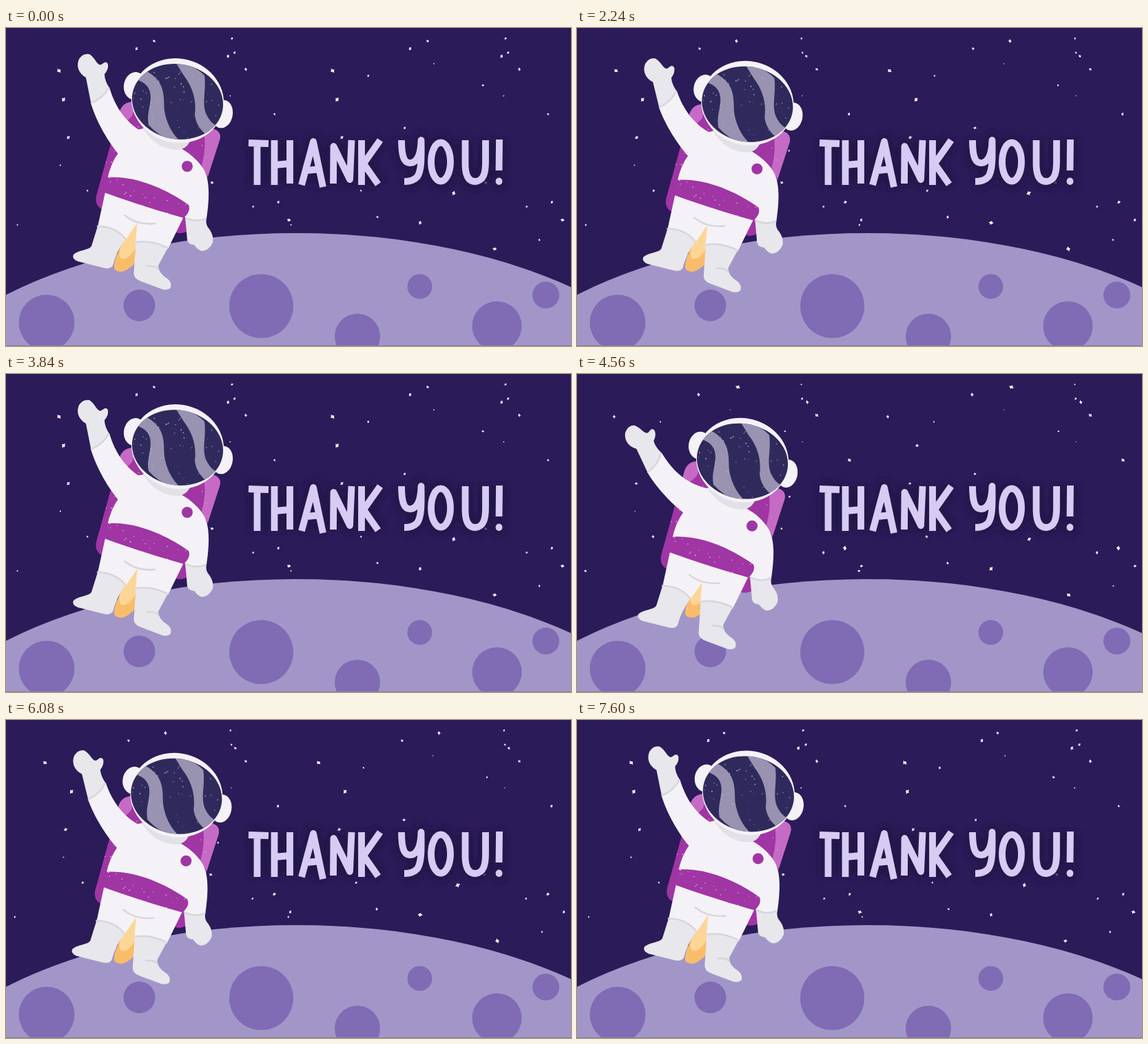
Write an HTML page that moves like this. It is 820x462 px and loops after 7680 ms.

```html
<!DOCTYPE html>
<html lang="en">
<head>
<meta charset="utf-8">
<title>Thank you!</title>
<style>
  html, body { margin: 0; width: 100%; height: 100%; overflow: hidden; background: #2b1b58; }
  svg { display: block; width: 100vw; height: 100vh; }
  .white { fill: #f4f2f6; }
  .grey { fill: #e8e7eb; }
  .violet { fill: #a035a4; }
  .pink { fill: #c66bc5; }
  .seam { fill: none; stroke: #d6d5db; stroke-width: 2.4; stroke-linecap: round; }
  .lettering { fill: none; stroke-linejoin: round; }
</style>
</head>
<body>
<svg viewBox="0 0 820 462" preserveAspectRatio="none">
  <defs>
    <filter id="blur" x="-10%" y="-30%" width="120%" height="160%"><feGaussianBlur stdDeviation="4"/></filter>
    <clipPath id="visorClip"><ellipse cx="249" cy="107" rx="66.500" ry="54.500" transform="rotate(11 249 107)"/></clipPath>
    <clipPath id="beltClip"><path d="M148 217C190 214 236 236 265 257Q269 266 258 276Q200 260 137 237Q140 222 148 217Z"/></clipPath>
    <clipPath id="packClip"><path d="M188 107L300 146Q314 150 310 163L270 287Q265 299 250 298L142 265Q128 259 131 244L165 121Q170 106 188 107Z"/></clipPath>
    <g id="words">
      <path d="M352 167L381 168M364.500 168L364.500 228M389.500 163L389.500 228M412 163L412 226M390 199L412 197"/>
      <path d="M429 228L446 165L460 231M436 207L456 205M475 226L475.500 172L499 220L501.500 163"/>
      <path d="M516 163L516 228M543 163L519 197L540 227M574 163C574 190 579 197 588 196C598 194 602 182 602.500 163C603 190 603 207 597 216Q591 223 578 223"/>
      <ellipse cx="631" cy="194.500" rx="14" ry="28"/>
      <path d="M666.500 163L666.500 199Q667 223 681 223C694 222 696 209 696 194L696 163M716 162L715.500 207"/>
      <path d="M715.500 222.500L715.500 223" stroke-linecap="round"/>
    </g>
  </defs>
  <rect width="820" height="462" fill="#2b1b58"/>
  <g id="stars" fill="#f6f3fa"></g>

  <ellipse cx="421.500" cy="603" rx="595" ry="305" fill="#a296c8"/>
  <g fill="#7f6cb4">
    <circle cx="59" cy="428" r="40.500"/>
    <circle cx="193.500" cy="403" r="23"/>
    <circle cx="370.500" cy="404" r="46.500"/>
    <circle cx="510" cy="448" r="33"/>
    <circle cx="600.500" cy="375.500" r="18"/>
    <circle cx="712.500" cy="433" r="36"/>
    <circle cx="783.500" cy="388" r="19.500"/>
  </g>
  <rect y="461" width="820" height="1" fill="#85829a"/>

  <g class="lettering" role="img" aria-label="THANK YOU!">
    <use href="#words" stroke="#21144a" stroke-width="22" filter="url(#blur)"/>
    <use href="#words" stroke="#d6ccf3" stroke-width="9.800"/>
  </g>

  <g class="body">
    <g clip-path="url(#packClip)">
      <rect class="violet" x="120" y="100" width="200" height="205"/>
      <path class="pink" d="M160 100L190 105L183 128L170 140L150 150ZM292 140L315 150L294 218L284 200Q292 170 286 145Z"/>
      <g id="packDust" fill="#f1c9ef"></g>
    </g>
  </g>

  <path fill="#f9bd6a" d="M195 272L166 318C159 333 155 346 158 351Q164 356 172 353Q184 347 190 338L202 300Z"/>
  <path fill="#fcd697" d="M195 272L167 316Q162 330 167 335Q177 338 188 320L202 290Z"/>

  <g class="body">
    <path class="white" d="M145 234L133 289Q158 289 174 307L190.500 283L188 314L235 321L259 272Z"/>
    <path class="grey" d="M133 288Q158 288 174 306Q160 325 155 345Q152 350 144 349L104 339Q95 335 98 329C106 322 120 323 124 317Z"/>
    <path class="grey" d="M188.500 311Q213 308 235 319L221 345Q221 356 234 364Q241 369 239 377Q236 381 228 380L196 368Q185 364 185.500 356Z"/>
    <path class="seam" d="M133 288Q158 288 173 306M189 311Q213 308 234 319M172 272Q190 287 216 284M205 346Q217 345 221 350"/>
    <path class="grey" d="M260 274L291 276Q289 286 295 292Q302 302 300 312Q294 324 284 324Q278 322 273 315Q265 315 263 308Z"/>
    <path class="white" d="M164 180Q152 196 147 220L150 238L258 274Q276 284 291 277C296 243 295 221 288 207C281 195 270 184 254 175L205 145L178 150Z"/>
    <path class="seam" d="M261 276Q276 283 290 277"/>
    <g clip-path="url(#beltClip)">
      <rect class="violet" x="130" y="205" width="145" height="78"/>
      <g id="beltDust" fill="#f1c9ef"></g>
    </g>
    <circle class="violet" cx="263" cy="201" r="8"/>
  </g>

  <g id="arm">
    <path class="white" d="M123 109Q137 102 150 86C158 114 175 142 207 155L202 205L165 185C149 167 131 136 123 109Z"/>
    <path class="grey" d="M123.500 110L116 72C104 65 102 54 106 45Q112 36 121 38Q126 41 131 49Q136 56 140 52Q146 47 148 53Q149 60 143 67Q143 76 150 87Q141 103 123.500 110Z"/>
    <path class="seam" d="M124 109Q141 102 149 87"/>
  </g>

  <g class="body">
    <path fill="#e2e1e6" d="M198 145Q218 178 252 177Q264 174 268 162Z"/>
    <ellipse class="white" cx="187" cy="84" rx="16" ry="20" transform="rotate(10 187 84)"/>
    <ellipse class="white" cx="314" cy="125" rx="15" ry="20.500" transform="rotate(10 314 125)"/>
    <ellipse class="white" cx="249" cy="105.500" rx="67.500" ry="61" transform="rotate(14 249 105.500)"/>
    <g clip-path="url(#visorClip)">
      <rect x="180" y="45" width="140" height="125" fill="#302a5c"/>
      <path fill="#9993b1" d="M186 74L192 60L206 64C234 80 228 105 230 120Q234 146 252 164Q228 164 207 141C203 122 214 106 208 90Q203 78 186 74ZM245 48Q274 54 288 69C291 90 284 108 290 124Q296 138 306 142L292 156Q276 144 274 126C277 104 270 84 258 69Z"/>
      <g id="visorDust" fill="#bcb6d2"></g>
    </g>
  </g>
</svg>
<script>
const NS = 'http://www.w3.org/2000/svg';
const FRAME = 80, CYCLE = 48, TURN = 2 * Math.PI;
const TILE = 397, SKY = 340;
const byId = id => document.getElementById(id);

function add(parent, tag, attrs) {
  const node = parent.appendChild(document.createElementNS(NS, tag));
  for (const key in attrs) node.setAttribute(key, attrs[key]);
  return node;
}

let seed = 11;
function random(low, high) {
  seed = (seed * 16807) % 2147483647;
  return low + (high - low) * seed / 2147483647;
}

function dust(id, count, x, y, width, height) {
  for (let i = 0; i < count; i++) {
    add(byId(id), 'circle', { cx: random(x, x + width), cy: random(y, y + height), r: random(0.35, 0.9) });
  }
}

dust('visorDust', 70, 185, 54, 130, 106);
dust('beltDust', 55, 135, 215, 135, 62);
dust('packDust', 60, 130, 105, 182, 190);

// The sky is one strip of stars, laid twice side by side.
const stars = [];
function addStar(x, y, sway, size) {
  const spin = random(0, 360);
  for (const left of [x, x + TILE]) {
    const node = add(byId('stars'), 'path', { d: 'M-.2-1.3L.5-.4L1.100.1L.4.5L.1 1.300L-.5.4L-1-.1L-.5-.5Z' });
    stars.push({ node, left, y, sway, size, spin });
  }
}

// Bright stars: x, y, sway
[[330, 41, 11], [227, 19, 17], [181, 30, -12], [62, 62, -21], [92, 104, 12], [348, 60, 0],
 [391, 253, -6], [412, 279, 2], [601, 283, 0], [654, 240, 6], [712, 321, 4]]
  .forEach(([x, y, sway]) => addStar(x, y, sway, 2.6));

const FAINT = 18;
for (let i = 0; i < FAINT; i++) {
  addStar(random(0, TILE), (i + random(0, 1)) * SKY / FAINT, random(-8, 8), random(0.9, 2.2));
}

const bodies = document.querySelectorAll('.body');

function draw(time) {
  const frame = Math.floor(time / FRAME) % CYCLE;
  const angle = frame / CYCLE * TURN;

  for (const { node, left, y, sway, size, spin } of stars) {
    const x = left + sway * Math.sin(angle - TURN / 8);
    const scale = size * (0.95 + 0.2 * Math.cos(2 * angle + spin));
    const tilt = spin + 40 * Math.sin(angle + spin);
    node.setAttribute('transform', `translate(${x} ${y}) rotate(${tilt}) scale(${scale})`);
  }

  // Two floats per cycle; the middle of the cycle runs slightly late.
  const lag = Math.max(0, -Math.cos(angle));
  const drop = (1 - Math.cos(2 * (frame - lag) / CYCLE * TURN)) / 2;
  const shift = `translate(${-10.5 * drop} ${23 * drop})`;
  bodies.forEach(body => body.setAttribute('transform', shift));
  byId('arm').setAttribute('transform', `${shift} rotate(${-16.4 * drop} 175 165)`);
}

const start = performance.now();
function tick() {
  draw(performance.now() - start);
  requestAnimationFrame(tick);
}
tick();
</script>
</body>
</html>
```
